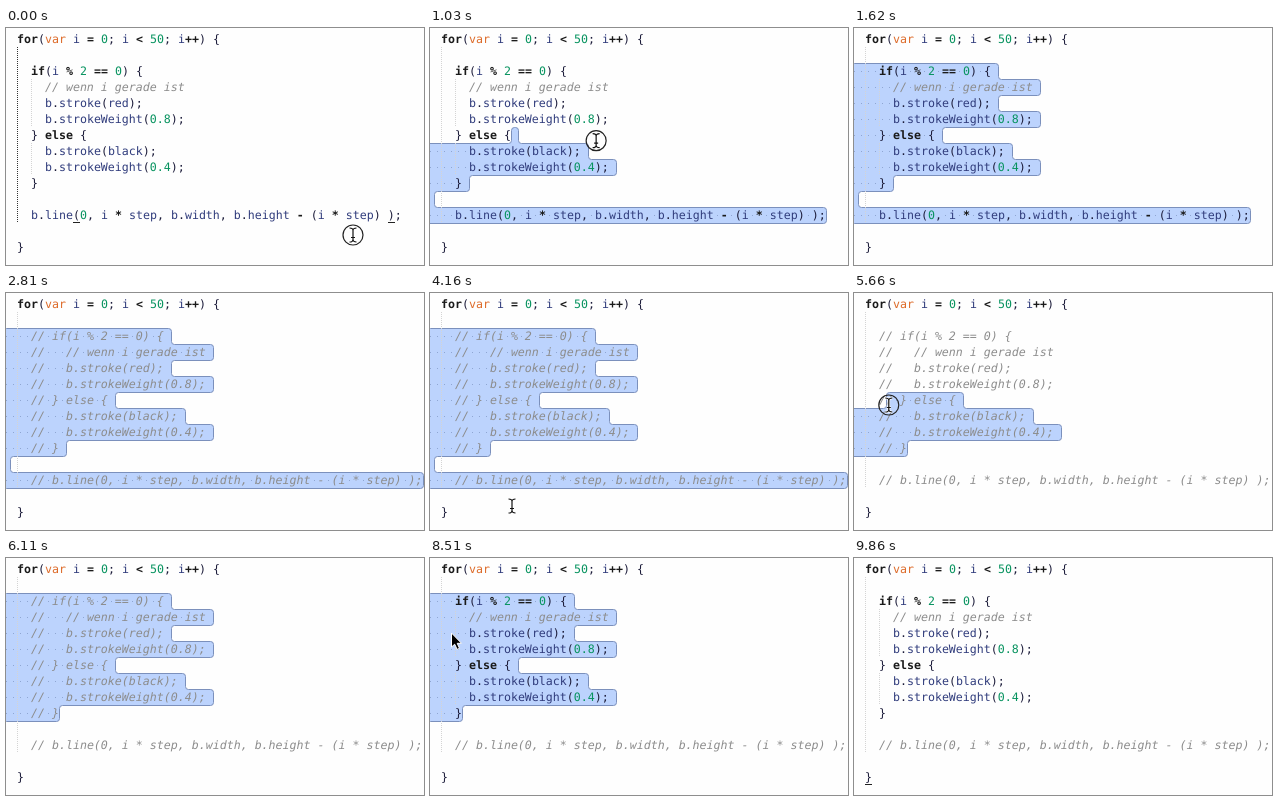
These frames come from a looping animation (418x237 px, 9960 ms). An HTML page:

```html
<!DOCTYPE html>
<html lang="de">
<head>
<meta charset="utf-8">
<title>Kommentieren im Editor</title>
<style>
html, body { margin: 0; width: 100%; height: 100%; overflow: hidden; background: #fefefe; }
svg { display: block; width: 418px; height: 237px; }
text {
  font: 11.627px "DejaVu Sans Mono", "Liberation Mono", monospace;
  white-space: pre;
  text-rendering: geometricPrecision;
  fill: #1c1c3a;
}
.key, .op { font-weight: bold; fill: #1a1a1a; }
.var { fill: #dd6a28; }
.num { fill: #07935f; }
.id { fill: #303c7c; }
.note { font-style: italic; fill: #8c8c8c; }
#sel { fill: #bcd3fd; stroke: #7b90bc; }
#dots { fill: #8fa6d2; }
.guide { stroke: #d4d4d4; stroke-dasharray: 1 1; }
.guide.on { stroke: #333; }
.mark { fill: #222; }
.halo { fill: none; stroke: #fff; stroke-width: 2.6; }
.stem { fill: none; stroke: #111; stroke-width: 1.2; }
#ring { fill: none; stroke: #222; stroke-width: 1.2; }
#arrow { fill: #000; stroke: #fff; stroke-width: 1; }
</style>
</head>
<body>
<svg viewBox="0 0 418 237">
  <path id="sel"/>
  <g id="dots"></g>
  <path class="guide" id="outer" d="M11.5 19V195"/>
  <path class="guide" id="inner" d="M25.5 51V99M25.5 115V147"/>
  <g id="code"></g>
  <g id="marks"></g>
  <rect id="caret" class="mark" x="17" y="212" width="1" height="15"/>
  <g id="mouse">
    <circle id="ring" r="10"/>
    <g id="beam">
      <path class="halo" d="M-3.5-7Q0-7 0-4.5Q0-7 3.5-7M0-5V5M-3.5 7Q0 7 0 4.5Q0 7 3.5 7M-2 2.5H2"/>
      <path class="stem" d="M-3.5-7Q0-7 0-4.5Q0-7 3.5-7M0-5V5M-3.5 7Q0 7 0 4.5Q0 7 3.5 7M-2 2.5H2"/>
    </g>
    <path id="arrow" d="M0 0V14L3.2 11.2L5.6 16.4L8 15.3L5.7 10.3H10Z"/>
  </g>
</svg>
<script>
const LOOP = 9960, CW = 7, LH = 16, LEFT = -3, TOP = 3;
const NS = "http://www.w3.org/2000/svg";
const $ = id => document.getElementById(id);
const colX = c => LEFT + c * CW;
const rowY = r => TOP + r * LH;
const within = (t, a, b) => t >= a && t < b;

const lines = [
  "  for(var i = 0; i < 50; i++) {",
  "",
  "    if(i % 2 == 0) {",
  "      // wenn i gerade ist",
  "      b.stroke(red);",
  "      b.strokeWeight(0.8);",
  "    } else {",
  "      b.stroke(black);",
  "      b.strokeWeight(0.4);",
  "    }",
  "",
  "    b.line(0, i * step, b.width, b.height - (i * step) );",
  "",
  "  }"
];
const noted = lines.map(s => s && "    // " + s.slice(4));

function add(parent, tag, attrs, body) {
  const el = document.createElementNS(NS, tag);
  for (const k in attrs) el.setAttribute(k, attrs[k]);
  if (body !== undefined) el.textContent = body;
  parent.appendChild(el);
  return el;
}

function kind(tok) {
  if (tok.startsWith("//")) return "note";
  if (/^(for|if|else)$/.test(tok)) return "key";
  if (tok === "var") return "var";
  if (/^\d/.test(tok)) return "num";
  if (/^\w/.test(tok)) return "id";
  return /^[=%<*+-]/.test(tok) ? "op" : "";
}

function textRow(str, r) {
  const el = add($("code"), "text", { x: LEFT, y: rowY(r) + 12 });
  for (const tok of str.match(/\/\/.*|[\d.]*\d|\w+|[=%<*+-]+|\s+|./g) || [])
    add(el, "tspan", { class: kind(tok) }, tok);
  return el;
}

const plainRows = lines.map(textRow);
const notedRows = noted.map((s, r) => r > 1 && r < 12 ? textRow(s, r) : null);

const isNoted = (r, t) => t >= 2810 && (r === 11 || (r > 1 && r < 10 && t < 7460));
const rowText = (r, t) => (isNoted(r, t) ? noted : lines)[r];

// Pointer poses: [time, x, y, look], each held until the next one
const poses = [];
function glide(start, count, x0, y0, x1, y1, look, step = 150) {
  for (let i = 0; i < count; i++) {
    const k = count > 1 ? i / (count - 1) : 0;
    poses.push([start + i * step, x0 + (x1 - x0) * k, y0 + (y1 - y0) * k, look]);
  }
}
const put = (t, x, y, look) => glide(t, 1, x, y, x, y, look);

put(0, 347, 207, "press");
put(150, 260, 188, "beam");
glide(440, 8, 399, 205, -8.5, 43.5, "press", 147);
put(1620, 0, 0, "none");
glide(3560, 2, 2, 95, 26, 130, "arrow");
glide(3860, 2, 52, 167, 74, 198, "beam");
put(4160, 82, 213, "beam");
glide(4310, 3, 82, 213, 80, 220, "press");
glide(4760, 3, 80, 206, 82, 168, "beam");
put(5210, 82, 160, "beam");
glide(5360, 6, 66, 158, -12, 43, "press");
put(6110, 0, 0, "none");
put(8510, 21.5, 75, "arrow");
glide(8660, 2, 62, 96, 110, 125, "arrow");
glide(8960, 3, 168, 152, 318, 212, "beam");
put(9410, 345, 226, "press");
put(9560, 0, 0, "none");

const poseAt = t => poses.filter(p => p[0] <= t).pop();

// Drag selections: start, drag end, cleared, anchor row
const drags = [[590, 1469, 4310, 11], [5360, 5960, 8510 + 900, 9]];

function selection(t) {
  const d = drags.find(d => within(t, d[0], d[2]));
  if (!d) return null;
  const end = d[3];
  let row = 2, col = 0;
  if (t < d[1] + 150) {
    const [, x, y] = poseAt(Math.min(t, d[1]));
    row = Math.max(2, Math.min(end, Math.floor((y - TOP) / LH)));
    col = Math.max(0, Math.min(rowText(row, t).length, Math.round((x - LEFT) / CW)));
  }
  return row === end && col >= rowText(end, t).length ? null : { row, col, end };
}

function rounded(pts) {
  let d = "";
  pts.forEach((p, i) => {
    const a = pts[(i + pts.length - 1) % pts.length], b = pts[(i + 1) % pts.length];
    const near = q => {
      const len = Math.hypot(q[0] - p[0], q[1] - p[1]) || 1, k = Math.min(3, len / 2) / len;
      return [p[0] + (q[0] - p[0]) * k, p[1] + (q[1] - p[1]) * k];
    };
    d += (i ? "L" : "M") + near(a) + "Q" + p + " " + near(b);
  });
  return d + "Z";
}

function drawSelection(t) {
  const s = selection(t);
  $("dots").textContent = "";
  if (!s) return $("sel").setAttribute("d", "");
  const y = r => rowY(r) + 0.5, x0 = colX(s.col) + 0.5;
  const pts = [[x0, y(s.row)]];
  for (let r = s.row; r <= s.end; r++) {
    const str = rowText(r, t);
    const x = colX(str.length + (r < s.end ? 1 : 0)) + 0.5;
    pts.push([x, y(r)], [x, y(r + 1)]);
    for (let c = r === s.row ? s.col : 0; c < str.length; c++)
      if (str[c] === " ")
        add($("dots"), "rect", { x: colX(c) + 3, y: rowY(r) + 8, width: 1, height: 1 });
  }
  if (s.row < s.end && s.col > 0)
    pts.push([LEFT - 0.5, y(s.end + 1)], [LEFT - 0.5, y(s.row + 1)], [x0, y(s.row + 1)]);
  else pts.push([x0, y(s.end + 1)]);
  $("sel").setAttribute("d", rounded(pts));
}

// Bracket underlines: row, column, then the spans when they show
const marks = [
  [11, 10, [0, 590]],
  [11, 55, [0, 590]],
  [0, 30, [4310, 5360], [9410, 9860]],
  [13, 2, [4310, 5360], [9410, LOOP]]
].map(([r, c, ...spans]) => ({
  spans,
  el: add($("marks"), "rect", { class: "mark", x: colX(c), y: rowY(r) + 15, width: CW, height: 1 })
}));

const show = (el, on) => el.style.display = on ? "" : "none";

function draw(t) {
  drawSelection(t);
  plainRows.forEach((el, r) => {
    show(el, !isNoted(r, t));
    if (notedRows[r]) show(notedRows[r], isNoted(r, t));
  });
  for (const m of marks) show(m.el, m.spans.some(s => within(t, ...s)));
  $("outer").classList.toggle("on", t < 590);
  show($("inner"), !isNoted(3, t));
  show($("caret"), within(t, 4310, 4610) || within(t, 9410, 9560));
  const [, x, y, look] = poseAt(t);
  $("mouse").setAttribute("transform", `translate(${x} ${y})`);
  show($("ring"), look === "press");
  show($("beam"), look === "press" || look === "beam");
  show($("arrow"), look === "arrow");
}

const begin = performance.now();
function tick() {
  draw((performance.now() - begin) % LOOP);
  requestAnimationFrame(tick);
}
tick();
</script>
</body>
</html>
```
